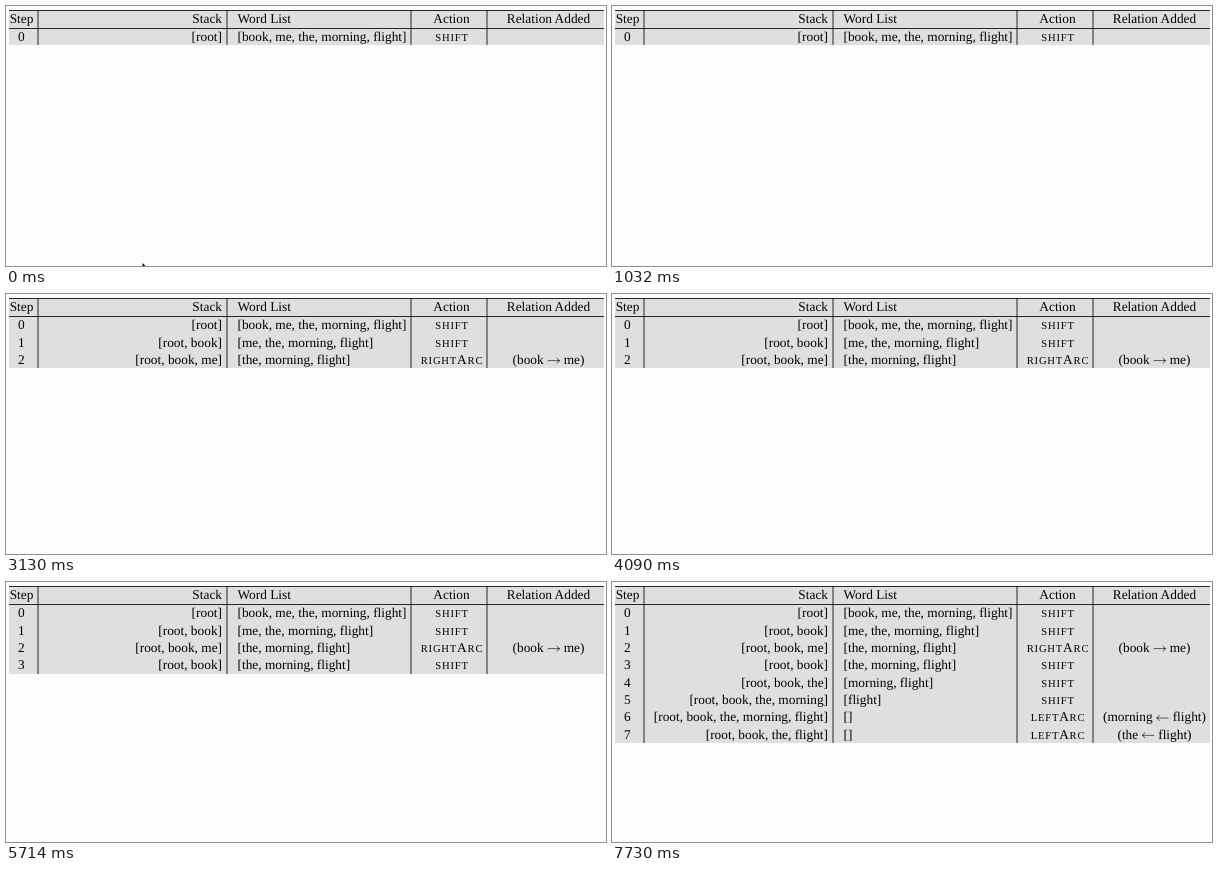
An HTML page that plays this animation: 600 by 260 pixels, repeating every 8 s.

```html
<!DOCTYPE html>
<html lang="en">
<head>
<meta charset="utf-8">
<title>Shift-reduce parsing trace</title>
<style>
html, body { margin: 0; width: 100%; height: 100%; overflow: hidden; background: #fdfdfd; }
svg { display: block; }
text { font: 13.35px "Liberation Serif", "Times New Roman", serif; text-rendering: geometricPrecision; white-space: pre; }
.caps { font-size: 10.6px; letter-spacing: .8px; }
.big { font-size: 13.35px; }
path { fill: none; stroke: #111; stroke-width: .9; }
.arrow { stroke-width: .65; }
</style>
</head>
<body>
<svg id="stage" width="600" height="260"></svg>
<script>
const LOOP = 8000, EM = 13.35;
const stage = document.getElementById("stage");
const columns = [32, 221, 405, 481];

// appearance time, stack, word list, action, relation (head, arrow, dependent)
const steps = [
  [0, "root", "book, me, the, morning, flight", "SHIFT"],
  [1700, "root, book", "me, the, morning, flight", "SHIFT"],
  [3130, "root, book, me", "the, morning, flight", "RIGHTARC", ["book", 1, "me"]],
  [4730, "root, book", "the, morning, flight", "SHIFT"],
  [6370, "root, book, the", "morning, flight", "SHIFT"],
  [6370, "root, book, the, morning", "flight", "SHIFT"],
  [6370, "root, book, the, morning, flight", "", "LEFTARC", ["morning", -1, "flight"]],
  [7730, "root, book, the, flight", "", "LEFTARC", ["the", -1, "flight"]]
];

function add(parent, tag, attrs, html = "") {
  const el = document.createElementNS("http://www.w3.org/2000/svg", tag);
  for (const key in attrs) el.setAttribute(key, attrs[key]);
  el.innerHTML = html;
  return parent.appendChild(el);
}

function label(parent, x, y, content, anchor = "middle", cls = "") {
  return add(parent, "text", { x, y, "text-anchor": anchor, class: cls }, content);
}

function band(parent, top, bottom) {
  add(parent, "rect", { x: 3, y: top, width: 595, height: bottom - top, fill: "#dfdfdf" });
  add(parent, "path", { d: columns.map(x => `M${x} ${top}V${bottom}`).join("") });
}

function relation(parent, y, [left, dir, right]) {
  const text = label(parent, 542.5, y, `(${left} \u2003 ${right})`);
  const x = text.getStartPositionOfChar(left.length + 2).x + EM / 2;
  add(parent, "path", {
    class: "arrow",
    transform: `translate(${x} ${y - 3.4}) scale(${dir} 1)`,
    d: "M-6 0H6M3.2 -2.9Q4 -.7 6.2 0Q4 .7 3.2 2.9"
  });
}

const header = add(stage, "g", {});
band(header, 4, 22);
label(header, 15.5, 17.4, "Step");
label(header, 216, 17.4, "Stack", "end");
label(header, 231.5, 17.4, "Word List", "start");
label(header, 445.5, 17.4, "Action");
label(header, 542.5, 17.4, "Relation Added");

const rowEdge = n => n ? Math.round(39.2 + 17.45 * (n - 1)) : 22;

const rows = steps.map(([, stack, words, action, rel], n) => {
  const row = add(stage, "g", {});
  const y = 35.3 + 17.35 * n;
  band(row, rowEdge(n), rowEdge(n + 1));
  label(row, 15.3, y, n);
  label(row, 216, y, `[${stack}]`, "end");
  label(row, 231.5, y, `[${words}]`, "start");
  label(row, 446, y, action.replace("A", '<tspan class="big">A</tspan>'), "middle", "caps");
  if (rel) relation(row, y, rel);
  return row;
});

add(stage, "path", { d: "M3 4.5H598M3 22.5H598" });
const pointer = add(stage, "path", { d: "M136.5 257L140 260.5H136.5Z", style: "fill:#000;stroke:none" });

function draw(now) {
  const t = now % LOOP;
  const show = (el, on) => el.setAttribute("visibility", on ? "visible" : "hidden");
  rows.forEach((row, n) => show(row, t >= steps[n][0]));
  show(pointer, t < 30);
}

const start = performance.now();
function tick() {
  draw(performance.now() - start);
  requestAnimationFrame(tick);
}
tick();
</script>
</body>
</html>
```
